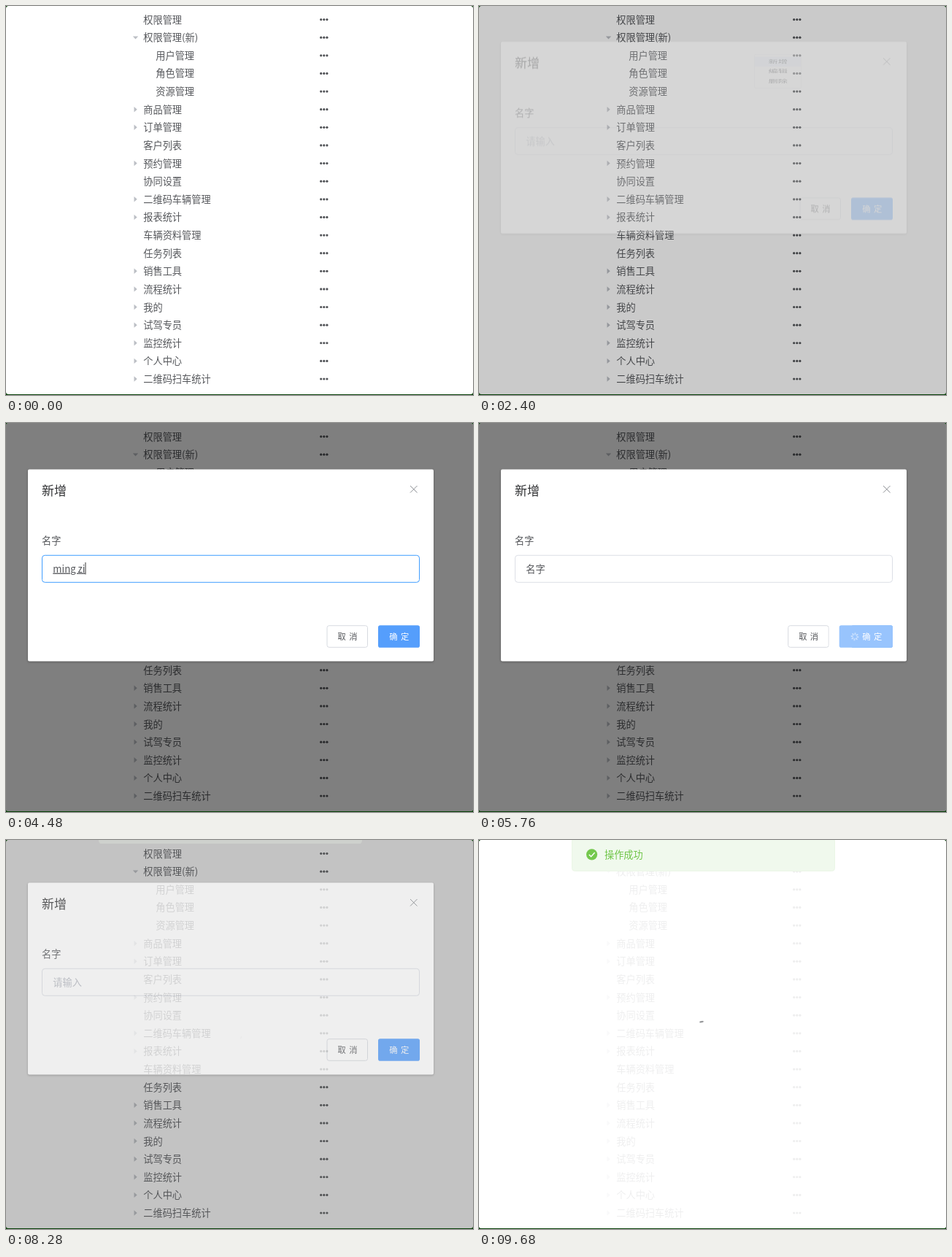
Recreate the animation shown at these times as an HTML page. Size 640 px wide and 533 px high, loop 9720 ms.

```html
<!DOCTYPE html>
<html lang="zh-CN">
<head>
<meta charset="utf-8">
<title>新增</title>
<style>
  html, body { margin: 0; width: 100%; height: 100%; overflow: hidden; background: #063f06; }
  svg { display: block; width: 640px; height: 533px; }
  text { font: 13.2px "Noto Sans CJK SC", "Noto Sans CJK", "Noto Sans", sans-serif; fill: #55575b; white-space: pre; }
  .small { font-size: 11.3px; font-weight: 500; letter-spacing: .9px; }
  .title { font-size: 17px; fill: #303133; }
  .hint { fill: #b9bcc4; }
  .compose { text-decoration: underline; }
  .success { fill: #6fc547; font-weight: 500; }
  .white { fill: #fff; }
  .line { fill: none; stroke-width: 1; }
  #menu { transform-origin: 0 66px; }
  #dialogBox { filter: drop-shadow(0 1px 1.5px rgba(0, 0, 0, .3)); }
</style>
</head>
<body>
<svg viewBox="0 0 640 533">
  <defs><clipPath id="window"><rect width="640" height="532" rx="3.5"/></clipPath></defs>
  <g clip-path="url(#window)">
    <rect width="640" height="532" fill="#fff"/>
    <g id="list"></g>

    <g id="menu">
      <rect x="377.5" y="66.5" width="64" height="119.5" rx="3.5" fill="#fff" stroke="#e6e9f0"/>
      <rect id="menuHover" x="378" y="75.5" width="63" height="34" fill="#ecf5ff"/>
      <text x="396.5" y="97.5">新增</text>
      <text x="396.5" y="131.5">编辑</text>
      <text x="396.5" y="165.5">删除</text>
    </g>

    <rect id="mask" width="640" height="532"/>

    <g id="loading">
      <rect width="640" height="532" fill="#fff" fill-opacity=".9"/>
      <g transform="translate(307.6 264.6) scale(.79)">
        <g id="ring"><circle id="arc" r="20" fill="none" stroke="#6b6d70" stroke-width="2" stroke-linecap="round"/></g>
      </g>
    </g>

    <g id="dialog">
      <rect id="dialogBox" x="30" y="63.5" width="556" height="263" rx="2" fill="#fff"/>
      <text class="title" x="49" y="99.3">新增</text>
      <path class="line" stroke="#8c8f94" d="M554 86l9.5 9.5m0-9.5l-9.5 9.5"/>
      <text x="49" y="166.3">名字</text>
      <rect id="field" class="line" x="49.5" y="181.3" width="517" height="37" rx="3.8"/>
      <g id="entry"></g>
      <rect id="caret" x="64.3" y="191" width="1" height="16.5" fill="#333"/>
      <g id="cancel">
        <rect class="line" x="440" y="277.7" width="55.5" height="29.6" rx="2.8" stroke="#d7dae0"/>
        <text class="small" x="454.5" y="296.8">取 消</text>
      </g>
      <rect id="confirm" x="510" y="277.2" width="57" height="30.5" rx="2.8"/>
      <g id="confirmBusy">
        <rect x="493.7" y="277.2" width="73.3" height="30.5" rx="2.8" fill="#98c4fd"/>
        <g transform="translate(515 292.7)"><g id="rays" stroke="#fff" stroke-linecap="round"></g></g>
      </g>
      <text class="small white" x="525.3" y="296.8">确 定</text>
    </g>

    <g id="message">
      <rect x="127.5" y="-2.5" width="360" height="45" rx="3.8" fill="#f0f9ed" stroke="#ebf6e6"/>
      <circle cx="154.6" cy="19.8" r="7.6" fill="#74c84d"/>
      <path d="M150.8 20l2.8 2.8 5-5.6" fill="none" stroke="#fff" stroke-width="1.4"/>
      <text class="success" x="172" y="24.8">操作成功</text>
    </g>
  </g>
</svg>
<script>
const LOOP = 9720;
const OPEN = 2350, FOCUS = 3340, CLICK = 5220, DONE = 8225, RING = 8195;
const ZOOM = 'cubic-bezier(.23, 1, .32, 1)';

const byId = id => document.getElementById(id);

function add(parent, tag, attrs, text = '') {
  const node = document.createElementNS('http://www.w3.org/2000/svg', tag);
  for (const name in attrs) node.setAttribute(name, attrs[name]);
  node.textContent = text;
  return parent.appendChild(node);
}

// steps: [time, properties, easing towards the next step]; values hold when no easing is given
function play(node, steps) {
  const all = [[0, steps[0][1]], ...steps, [LOOP, steps[steps.length - 1][1]]];
  const frames = all.map(([time, props, easing = 'step-end']) => ({ ...props, offset: time / LOOP, easing }));
  node.animate(frames, { duration: LOOP, iterations: Infinity });
}

function show(node, ...spans) {
  const steps = [[0, { visibility: 'hidden' }]];
  for (const [from, to] of spans) {
    steps.push([from, { visibility: 'visible' }], [to, { visibility: 'hidden' }]);
  }
  play(node, steps);
}

// Tree: '>' closed branch, 'v' open branch, '-' child, ' ' plain entry
const rows = [
  ' 权限管理', 'v权限管理(新)', '-用户管理', '-角色管理', '-资源管理', '>商品管理', '>订单管理',
  ' 客户列表', '>预约管理', ' 协同设置', '>二维码车辆管理', '>报表统计', ' 车辆资料管理', ' 任务列表',
  '>销售工具', '>流程统计', '>我的', '>试驾专员', '>监控统计', '>个人中心', '>二维码扫车统计'
];
const carets = { '>': 'M175.5-3.7l4.2 3.7-4.2 3.7z', 'v': 'M173.8-1.6h7.4l-3.7 4z' };
rows.forEach((row, i) => {
  const group = add(byId('list'), 'g', { transform: `translate(0 ${18.6 + 24.62 * i})` });
  const kind = row[0];
  if (carets[kind]) add(group, 'path', { d: carets[kind], fill: '#bcbfc5' });
  add(group, 'text', { x: kind === '-' ? 205.3 : 188.3, y: 5 }, row.slice(1));
  for (const x of [431.7, 435.8, 439.9]) add(group, 'circle', { cx: x, cy: 0, r: 1.6, fill: '#505256' });
});

for (let i = 0; i < 8; i++) {
  add(byId('rays'), 'line', { y1: -2.9, y2: -4.9, 'stroke-width': .95, transform: `rotate(${45 * i})` });
}

// Dropdown menu
const folded = { opacity: 0, transform: 'scaleY(0)' };
const unfolded = { opacity: 1, transform: 'scaleY(1)' };
play(byId('menu'), [[1790, folded, ZOOM], [2080, unfolded], [OPEN, unfolded, ZOOM], [OPEN + 300, folded]]);
show(byId('menuHover'), [2040, OPEN + 300]);

// Dialog and its backdrop
play(byId('mask'), [
  [OPEN, { opacity: 0 }, 'ease'], [OPEN + 200, { opacity: .5 }],
  [DONE, { opacity: .5 }, 'ease'], [DONE + 200, { opacity: 0 }]
]);
const raised = { opacity: 0, transform: 'translateY(-19px)' };
const settled = { opacity: 1, transform: 'translateY(0px)' };
play(byId('dialog'), [
  [OPEN, raised, 'ease'], [OPEN + 300, settled], [DONE, settled, 'ease'], [DONE + 300, raised]
]);

// Input field: hover, focus, blur
const border = stroke => ({ stroke });
play(byId('field'), [
  [3190, border('#dcdfe6'), 'ease'], [FOCUS, border('#c0c4cc'), 'ease'], [FOCUS + 200, border('#409eff')],
  [5140, border('#409eff'), 'ease'], [5340, border('#dcdfe6')]
]);

// Typing: composed letters, then the chosen word
const typing = [
  [FOCUS, ''], [3680, 'm'], [3780, 'mi'], [3880, 'min'], [3980, 'ming'],
  [4120, 'ming z'], [4220, 'ming zi'], [4520, '名字'], [DONE, '']
];
const caretSteps = typing.slice(0, -1).map(([time, text], i) => {
  if (!text) return [time, { transform: 'translateX(0px)' }];
  const style = text === '名字' ? '' : 'compose';
  const node = add(byId('entry'), 'text', { x: 64.3, y: 204.6, class: style }, text);
  show(node, [time, typing[i + 1][0]]);
  return [time, { transform: `translateX(${node.getComputedTextLength()}px)` }];
});
play(byId('caret'), caretSteps);
show(byId('caret'), [FOCUS, 5040]);
show(add(byId('entry'), 'text', { x: 64.3, y: 204.6, class: 'hint' }, '请输入'), [0, 3680], [DONE, LOOP]);

// Buttons
play(byId('confirm'), [
  [4880, { fill: '#559efc' }, 'ease'], [4980, { fill: '#6db0fd' }], [DONE, { fill: '#559efc' }]
]);
show(byId('confirmBusy'), [CLICK, DONE]);
play(byId('cancel'), [
  [0, { transform: 'translateX(0px)' }],
  [CLICK, { transform: 'translateX(-16.3px)' }],
  [DONE, { transform: 'translateX(0px)' }]
]);

// Spinners turn once in two seconds
const turn = ms => ({ transform: `rotate(${ms * .18}deg)` });
play(byId('rays'), [[CLICK, turn(0), 'linear'], [DONE, turn(DONE - CLICK)]]);
play(byId('ring'), [[RING, turn(0), 'linear'], [LOOP, turn(LOOP - RING)]]);
const dash = (length, gap, shift) => ({ strokeDasharray: `${length}px, ${gap}px`, strokeDashoffset: `${shift}px` });
play(byId('arc'), [
  [RING, dash(1, 200, 0), 'ease-in-out'], [RING + 750, dash(90, 150, -40), 'ease-in-out'],
  [RING + 1500, dash(90, 150, -120)], [RING + 1500, dash(1, 200, 0)]
]);

// Reload veil and success message
play(byId('loading'), [[DONE + 20, { opacity: 0 }, 'ease'], [DONE + 320, { opacity: 1 }]]);
play(byId('message'), [[DONE, { opacity: 0 }, 'ease'], [DONE + 300, { opacity: 1 }]]);
play(byId('message'), [
  [DONE, { transform: 'translateY(-45px)' }, 'ease'], [DONE + 400, { transform: 'translateY(0px)' }]
]);
</script>
</body>
</html>
```
